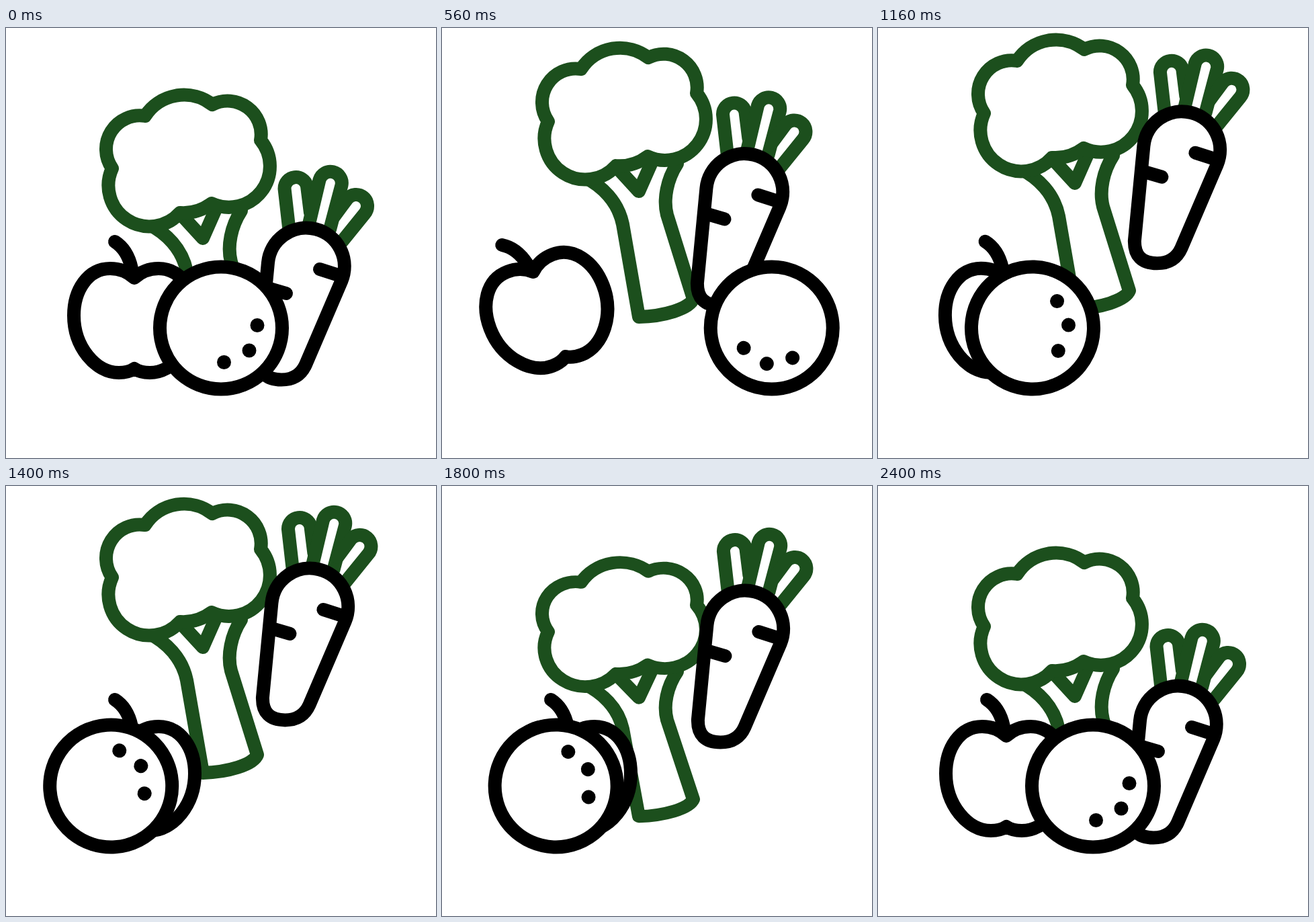
These frames come from a looping animation (640 px wide and 640 px high, 3 s). An HTML page:

```html
<!DOCTYPE html>
<html lang="en">
<head>
<meta charset="utf-8">
<title>Fruit and vegetables</title>
<style>
  html, body { margin: 0; width: 100%; height: 100%; overflow: hidden; background: #fff; }
  svg { display: block; width: 100vw; height: 100vh; }
  path, .skin { fill: #fff; stroke: #000; stroke-width: 20; stroke-linecap: round; stroke-linejoin: round; }
  .green { stroke: #1c4f1d; }
  .line { fill: none; }
</style>
</head>
<body>
<svg viewBox="0 0 640 640">
  <g id="broccoli">
    <path class="green" d="M212 292C238 305 262 328 269 362L293 500C330 499 368 488 374 473L335 348C329 325 335 295 350 272"/>
    <path class="green" d="M259 276L293 313L312 270"/>
    <path class="green" d="M158 209A50 50 0 0 1 207 131A69 69 0 0 1 307 114A50 50 0 0 1 379 167A61 61 0 0 1 306 261A70 70 0 0 1 259 275A61 61 0 0 1 158 209Z"/>
  </g>
  <g id="carrot">
    <path class="green line" d="M422 305L414.500 239A17 17 0 0 1 448 235L453 275"/>
    <path class="green line" d="M449 300L466.500 226A17 17 0 0 1 499.500 234L482 300"/>
    <path class="green line" d="M488 281L508 254A17 17 0 0 1 534 276L500 318"/>
    <path d="M390 349A57 57 0 1 1 499.300 376.600L446 501Q436 523.500 410 523.500Q376 523.500 376.500 490Z"/>
    <path class="line" d="M467 359L492 367M417 395L393 388"/>
  </g>
  <g id="apple">
    <path class="line" d="M162 318Q181 330 187 358"/>
    <path d="M191 372Q176 358 155 358C122 358 101 390 101 428C101 474 133 513 168 513Q182 513 191 507Q200 513 214 513C249 513 281 474 281 428C281 390 260 358 227 358Q206 358 191 372Z"/>
  </g>
  <g id="orange">
    <circle class="skin" r="91"/>
    <circle cx="54" cy="-4" r="10.500"/>
    <circle cx="42" cy="33.500" r="10.500"/>
    <circle cx="4.500" cy="51" r="10.500"/>
  </g>
</svg>
<script>
const LOOP = 3000, MOVE_END = 2400, STEP = 40;

const bezier = (x1, y1, x2, y2) => x => {
  const at = (a, b, s) => 3 * a * s * (1 - s) ** 2 + 3 * b * s * s * (1 - s) + s ** 3;
  let lo = 0, hi = 1;
  for (let i = 0; i < 24; i++) {
    const mid = (lo + hi) / 2;
    if (at(x1, x2, mid) < x) lo = mid; else hi = mid;
  }
  return at(y1, y2, lo);
};

const soft = bezier(1 / 3, 0, 2 / 3, 1);
const roll = bezier(.56, 0, .44, 1);
const swing = bezier(.6, 0, .37, 1);
const settle = bezier(.64, 0, .4, 1);
const spin = bezier(.65, 0, .45, 1);
const rise = bezier(.1, .6, .4, 1);
const fall = bezier(.6, 0, .9, .4);

// Each key is [time, value, easing from the previous key].
const track = (...keys) => t => {
  const i = keys.findIndex(key => t < key[0]);
  if (i < 0) return keys[keys.length - 1][1];
  if (i === 0) return keys[0][1];
  const [t0, v0] = keys[i - 1], [t1, v1, ease = soft] = keys[i];
  return v0 + (v1 - v0) * ease((t - t0) / (t1 - t0));
};

const orangeX = track([0, 320], [581, 491, roll], [1534, 149.5, swing], [2400, 320, settle]);
const orangeTurn = track([0, 0], [581, 59.5, spin], [1534, -75, swing], [2400, 0, settle]);
const appleTilt = track([0, 0], [375, -23.7], [1250, 0]);
const broccoliY = track([255, 0], [960, -84, rise], [1817, 0, fall]);
const broccoliSquash = track([0, 1], [250, .94], [365, 1], [1700, 1], [1820, .94], [2400, 1]);
const carrotY = track([320, 0], [1340, -175.5, rise], [2110, 0, fall]);
const carrotSquash = track([0, 1], [320, .93], [450, 1], [2000, 1], [2120, .93], [2400, 1]);

const place = (id, transform) => document.getElementById(id).setAttribute('transform', transform);
const squash = (scale, ground) => `translate(0 ${ground}) scale(1 ${scale}) translate(0 ${-ground})`;

function draw(now) {
  const t = Math.min(Math.floor(now % LOOP / STEP) * STEP, MOVE_END);
  const lift = carrotY(t);
  place('broccoli', `translate(0 ${broccoliY(t)}) ${squash(broccoliSquash(t), 510)}`);
  place('carrot', `translate(${-lift * .031} ${lift}) ${squash(carrotSquash(t), 534)}`);
  place('apple', `rotate(${appleTilt(t)} 139 517)`);
  place('orange', `translate(${orangeX(t)} 446.5) rotate(${orangeTurn(t)})`);
  requestAnimationFrame(draw);
}
draw(0);
</script>
</body>
</html>
```
